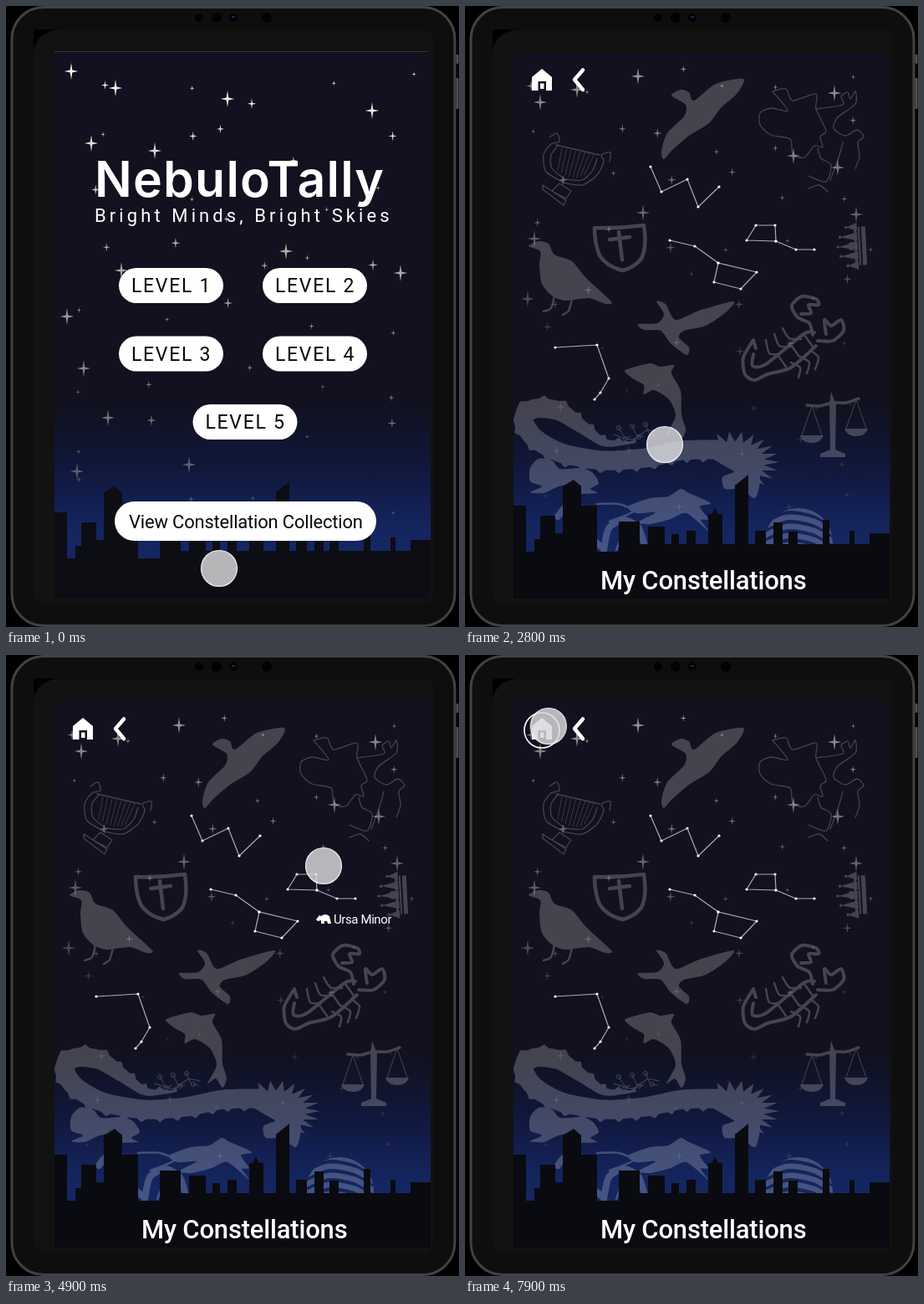
An HTML page for the animation above (8 s loop, 542 by 742 pixels).

```html
<!DOCTYPE html>
<html lang="en">
<head>
<meta charset="utf-8">
<title>Night sky tablet</title>
<style>
html, body { margin: 0; width: 100%; height: 100%; overflow: hidden; background: #000; }
svg { display: block; width: 542px; height: 742px; }
text { font-family: Roboto, Arial, sans-serif; fill: #fff; white-space: pre; }
.brand { font: 600 59px Inter, sans-serif; letter-spacing: 1.2px; }
.tag { font-size: 22px; letter-spacing: 4.1px; }
.level { font-size: 23px; letter-spacing: 1.7px; fill: #08080c; }
.view { font-size: 22px; letter-spacing: -.2px; fill: #08080c; }
.heading { font-size: 31px; font-weight: 500; letter-spacing: -.2px; }
.name { font-size: 15px; letter-spacing: -.4px; }
.line { fill: none; stroke: #fff; stroke-linejoin: round; stroke-linecap: round; }
#art { fill: #fff; opacity: .21; }

.view, .ring, .page, .label, .homeRing, .house, .cursor, .dot { animation: 8s linear infinite; }
.view, .ring, .label, .homeRing, .house { animation-timing-function: step-end; }
.view { animation-name: blue; }
.ring { animation-name: ring; }
.page { animation-name: page; }
.label { animation-name: label; }
.homeRing { animation-name: atHome; }
.house { animation-name: house; }
.cursor { animation-name: move; }
.dot { animation-name: press; }

@keyframes blue { 0%, 100% { fill: #08080c; } 7% { fill: #2946dc; } 25% { fill: #08080c; } }
@keyframes ring { 0%, 100% { opacity: 0; } 7% { opacity: 1; } 25% { opacity: 0; } }
@keyframes page { 0%, 21.25% { opacity: 0; } 25%, 100% { opacity: 1; } }
@keyframes label { 0%, 100% { opacity: 0; } 54% { opacity: 1; } 79.5% { opacity: 0; } }
@keyframes atHome { 0% { opacity: 0; } 90%, 100% { opacity: 1; } }
@keyframes house { 0% { fill: #fff; } 90%, 100% { fill: #dfe6ff; } }
@keyframes press {
  0%, 14% { transform: none; filter: none; }
  16%, 21% { transform: scale(.95); filter: drop-shadow(0 3px 2px rgba(0,0,0,.35)); }
  23%, 100% { transform: none; filter: none; }
}
@keyframes move {
  0%, 1.25% { transform: translate(255px, 672px); animation-timing-function: ease-in-out; }
  11.25%, 25% { transform: translate(283px, 605px); animation-timing-function: ease-in-out; }
  35%, 40% { transform: translate(239px, 524px); animation-timing-function: ease-in; }
  45% { transform: translate(293px, 349px); animation-timing-function: ease-out; }
  55%, 78.75% { transform: translate(380px, 252px); animation-timing-function: cubic-bezier(.4,0,.8,.8); }
  86.25% { transform: translate(176px, 118px); animation-timing-function: cubic-bezier(.2,.4,.5,1); }
  91.25%, 100% { transform: translate(99.8px, 85px); }
}
</style>
</head>
<body>
<svg viewBox="0 0 542 742">
  <defs>
    <linearGradient id="sky" x2="0" y2="1">
      <stop offset="0" stop-color="#11111f"/>
      <stop offset=".65" stop-color="#11111f"/>
      <stop offset=".76" stop-color="#10173b"/>
      <stop offset=".87" stop-color="#14255e"/>
      <stop offset="1" stop-color="#15286a"/>
    </linearGradient>
    <clipPath id="screen"><rect x="58" y="54" width="450" height="654"/></clipPath>
    <clipPath id="globe"><circle cx="399" cy="641" r="41"/></clipPath>
    <g id="city"></g>
  </defs>

  <!-- tablet -->
  <g fill="#515153">
    <rect x="538.5" y="58" width="3" height="11" rx="1"/>
    <rect x="538.5" y="86" width="3" height="37" rx="1"/>
  </g>
  <rect x="7" y="1.5" width="530" height="739" rx="38" fill="#0e0e0e" stroke="#424243" stroke-width="3"/>
  <rect x="32" y="28" width="480" height="686" rx="12" fill="#121213" stroke="#0e0e0f" stroke-width="2"/>
  <path d="M33 54V32Q33 28 38 28H62Q36 32 33 54Z"/>
  <g fill="#020203">
    <circle cx="231" cy="14" r="5"/><circle cx="252" cy="14" r="6"/>
    <circle cx="272" cy="14" r="5"/><circle cx="312" cy="14" r="6"/>
  </g>
  <path d="M269 14Q272 10 275 14Z" fill="#25247c"/>

  <g clip-path="url(#screen)">
    <!-- menu -->
    <rect x="58" y="54" width="450" height="654" fill="url(#sky)"/>
    <path d="M58 54.5H504" stroke="#37373f"/>
    <g id="menuStars" fill="#fffdf2"></g>
    <use href="#city" y="8" fill="#0d0d14"/>
    <text class="brand" x="106" y="228">NebuloTally</text>
    <text class="tag" x="106" y="258">Bright Minds, Bright Skies</text>
    <g id="levels"></g>
    <rect x="130" y="592" width="313" height="47" rx="23.5" fill="#fff"/>
    <rect class="ring line" x="124" y="586" width="325" height="60.5" rx="30" stroke-width="1.7"/>
    <text class="view" x="147" y="624">View Constellation Collection</text>

    <!-- collection -->
    <g class="page">
      <rect x="58" y="54" width="450" height="654" fill="url(#sky)"/>
      <path d="M58 54.5H508" stroke="#121213"/>
      <g id="art"></g>
      <g id="pageStars" fill="#fffdf2"></g>
      <g id="figures"></g>
      <use href="#city" fill="#0a0b10"/>
      <text class="heading" x="162" y="697">My Constellations</text>
      <path class="house" fill-rule="evenodd" d="M92 75L104 85V101H97V90H87.500V101H80V85ZM90 92.500H94.500V99H90Z"/>
      <path class="line" d="M141 76.500L131 88L141 100" stroke-width="4.500" stroke-linecap="butt" stroke-linejoin="miter"/>
      <circle class="homeRing line" cx="92" cy="90" r="21" stroke-width="1.6"/>
      <g class="label">
        <path fill="#fff" d="M371 316L375 311L377 312Q382 308 387 312L389 321H385L384 318L381 318V321H377V317L373 318Z"/>
        <text class="name" x="392" y="321">Ursa Minor</text>
      </g>
    </g>
  </g>

  <g class="cursor">
    <circle class="dot" r="21.5" fill="#dcdcde" fill-opacity=".82" stroke="#fff" stroke-opacity=".9" stroke-width="1.2"/>
  </g>
</svg>
<script>
const put = (id, html) => { document.getElementById(id).innerHTML = html; };
const times = (n, f) => Array.from({ length: n }, (_, i) => f(i));
const points = s => s.split(' ').map(p => p.split(',').map(Number));
const random = seed => () => (seed = seed * 16807 % 2147483647) / 2147483647;

// Smooth curve through key points
function curve(s, closed) {
  const p = points(s), n = p.length;
  const at = i => closed ? p[(i + n) % n] : p[Math.max(0, Math.min(n - 1, i))];
  const bend = (a, b, c, k) => [0, 1].map(j => (a[j] + (c[j] - b[j]) * k).toFixed(1));
  let d = 'M' + p[0];
  for (let i = 0; i < (closed ? n : n - 1); i++) {
    const [a, b, c, e] = [at(i - 1), at(i), at(i + 1), at(i + 2)];
    d += `C${bend(b, a, c, .13)} ${bend(c, b, e, -.13)} ${c}`;
  }
  return d + (closed ? 'Z' : '');
}
const blob = s => `<path d="${curve(s, true)}"/>`;
const stroke = (d, w) => `<path class="line" d="${d}" stroke-width="${w}"/>`;
const lines = (w, ...runs) => stroke(runs.map(r => curve(r)).join(''), w);

// Band of changing width along a curve, with optional spikes on one side
function ribbon(s, width, spike) {
  const path = document.createElementNS('http://www.w3.org/2000/svg', 'path');
  path.setAttribute('d', curve(s));
  const len = path.getTotalLength(), n = 80, left = [], right = [];
  for (let i = 0; i <= n; i++) {
    const a = path.getPointAtLength(len * i / n - .5), b = path.getPointAtLength(len * i / n + .5);
    const t = Math.atan2(b.y - a.y, b.x - a.x), w = width(i / n) / 2;
    const off = r => [b.x + r * Math.sin(t), b.y - r * Math.cos(t)].map(v => v.toFixed(1));
    left.push(off(w));
    right.unshift(off(-w - (i % 4 ? 0 : spike)));
  }
  return `<path d="M${left.concat(right).join('L')}Z"/>`;
}

// Four-pointed star
function star(x, y, r, alpha) {
  const d = times(8, i => {
    const a = i * Math.PI / 4, k = i % 2 ? r * .22 : r;
    return [x + k * .82 * Math.sin(a), y - k * Math.cos(a)].map(v => v.toFixed(1));
  });
  return `<path opacity="${alpha.toFixed(2)}" d="M${d.join('L')}Z"/>`;
}

// Bright key stars plus a jittered grid of small ones
function stars(id, keys, cols, rows, seed, fade) {
  const rnd = random(seed);
  const small = times(cols * rows, i => [
    58 + 450 / cols * (i % cols + .15 + .7 * rnd()),
    60 + 560 / rows * (Math.floor(i / cols) + .15 + .7 * rnd()),
    3 + 4 * rnd() ** 1.5
  ]);
  put(id, points(keys).map(p => [...p, 10]).concat(small)
    .map(([x, y, r]) => star(x, y, r, fade(y))).join(''));
}
stars('menuStars', '78,78 131,98 265,111 438,125 102,164 178,173 335,293 138,316 472,319 73,371 93,433 122,492 219,548 85,556',
  5, 8, 734211, y => Math.max(.28, 1.08 - y / 720));
stars('pageStars', '468,249 213,247 207,84 134,100 90,115 83,278 442,104 393,179 446,193 75,350',
  6, 9, 918273, y => Math.max(.12, .62 - y / 900));

put('levels', times(5, i => {
  const x = i < 4 ? 135 + i % 2 * 172 : 223.5, y = 313 + Math.floor(i / 2) * 81.5;
  return `<rect x="${x}" y="${y}" width="125" height="42" rx="21" fill="#fff"/>` +
    `<text class="level" x="${x + 15}" y="${y + 29}">LEVEL ${i + 1}</text>`;
}).join(''));

// Towers are x, width, top
const towers = '58,15,597 83,7,637 90,18,609 108,9,630 117,22,573 139,19,597 184,25,616 219,20,622 ' +
  '247,9,631 265,11,627 291,17,607 323,16,572 347,13,627 369,11,617 387,11,628 428,8,614 460,6,627 484,24,630';
put('city', '<path d="M58 720V652H209V643H508V720ZM117 574L130 566L139 574ZM323 573L339 560V573ZM295 608L299 599L303 608Z"/>' +
  points(towers).map(([x, w, y]) => `<rect x="${x}" y="${y}" width="${w}" height="${720 - y}"/>`).join(''));

put('figures', [
  '222,192 235,222 266,207 279,240 304,216',
  '245,280 275,287 303,307 349,318 330,338 298,330 303,307',
  '418,291 396,291 372,281 337,280 348,262 371,262 372,281',
  '108,408 158,405 172,445 162,462 155,470'
].map(run => `<polyline class="line" points="${run}" stroke-width="1.2" opacity=".65"/>` +
  points(run).map(([x, y]) => `<circle cx="${x}" cy="${y}" r="1.6" fill="#fff"/>`).join('')).join(''));

const birds =
  blob('247,107 258,100 268,103 274,113 300,93 333,87 326,104 306,122 292,140 268,155 248,172 238,183 235,174 242,152 262,132 264,118') +
  blob('76,287 88,281 100,284 107,297 128,305 145,325 175,353 168,356 148,349 120,352 104,346 92,332 89,310 90,293') +
  lines(2.5, '107,346 103,361 94,365', '128,350 124,364 117,369') +
  blob('207,380 230,379 238,368 229,353 240,356 252,375 280,364 321,353 312,366 288,382 262,388 256,396 268,408 265,417 246,403 234,388 214,387');

const dolphin = blob('191,436 204,431 222,427 234,431 250,429 247,439 258,460 259,488 264,506 259,517 251,506 241,512 252,490 244,470 226,459 214,464 214,453 202,446');

const lyre =
  lines(1.3, '118,211 97,198 94,178 103,165 113,162 110,152 101,157', '118,211 140,214 158,202 166,186 163,178 174,175 173,186',
    '120,207 104,194 103,178 112,166', '120,207 140,208 153,196 158,182', '109,166 161,178') +
  stroke('M93 214L121 232L118 238L93 219ZM113 212L127 221L121 230L104 221Z', 1.3) +
  times(8, i => stroke(`M${116 + 5.5 * i} ${170 + i}L${111 + 4.5 * i} ${196 + 9 * Math.sin(i / 3)}`, .8)).join('');

const hero = lines(1.3,
  '368,102 384,99 392,113 420,105 420,123 432,149 425,156 428,169 418,167 406,181 392,177 389,159 366,154 353,142 353,128 366,122 386,125 368,102',
  '420,123 452,118 450,108 458,103 461,111 467,102 467,117 446,133 441,146 455,155 469,148 477,156 470,163 472,180 467,194',
  '452,163 447,181 437,208', '422,170 426,182 438,190 432,210 411,203', '411,218 424,214 434,222');

const crown = `<g transform="rotate(-3 465 287)">` +
  times(5, i => {
    const y = 264 + 11.5 * i, tip = 457 - 11 * Math.sin(Math.PI * i / 4);
    return `<path d="M470 ${y - 5}L${tip} ${y}L470 ${y + 5}Z"/><circle cx="${tip}" cy="${y}" r="1.8"/>`;
  }).join('') + '<path d="M466 265H469V309H466ZM471 264H473V310H471ZM475 264H480V310H475Z"/></g>' +
  '<circle class="line" cx="463" cy="287" r="4" stroke-width="2"/>';

const shield = stroke('M155 265Q185 266 214 262Q218 288 211 302Q203 312 189 316Q170 312 161 298Q155 284 155 265ZM184 270L188 303M173 279L197 276', 4.5);

const scorpion =
  lines(4, '345,399 333,420 335,440 346,447 362,440 390,432 420,406', '345,399 348,409', '345,416 344,430 360,428 405,392 418,390',
    '416,393 412,379 398,372 391,358 403,347 420,350 423,357 411,357 414,367 402,368',
    '422,400 440,400 453,388 450,375 438,382 430,375 432,392') +
  times(3, i => lines(2.5,
    `${402 - 13 * i},${398 + 9 * i} ${388 - 12 * i},${397 + 9 * i} ${380 - 10 * i},${385 + 7 * i}`,
    `${414 - 12 * i},${412 + 7 * i} ${423 - 11 * i},${420 + 6 * i} ${419 - 10 * i},${434 + 5 * i}`) +
    stroke(`M${406 - 16 * i} ${393 + 12 * i}l10 14`, 2.5)).join('');

const mane = times(27, i => {
  const a = -2.1 + i * .14, r = i % 2 ? 54 : 36;
  return `${(322 + r * Math.cos(a)).toFixed(1)} ${(545 + r * .68 * Math.sin(a)).toFixed(1)}`;
});
const dragon =
  ribbon('205,521 168,522 140,503 112,484 84,481 69,492 82,515 115,534 165,543 215,540 260,531 305,530',
    t => Math.min(23, 2 + 80 * t), 4) +
  `<path d="M${mane.join('L')}L322 556L296 541Z"/>` +
  blob('345,545 322,557 308,563 311,577 330,577 347,588 353,565') +
  lines(1.2, '178,512 200,518 218,507 232,509') +
  times(6, i => {
    const x = 184 + 8 * i, y = 512 + (i % 2 ? 6 : -8) - i;
    return stroke(`M${x + 6} 514L${x} ${y}`, 1) + `<circle class="line" cx="${x}" cy="${y}" r="2.5"/>`;
  }).join('');

const pan = (x, y, top) => stroke(`M${x - 12} ${y}L${x} ${top}L${x + 12} ${y}`, 1) +
  `<path d="M${x - 14} ${y}h28q-3 9 -14 9q-11 0 -14 -9Z"/>`;
const scales = pan(415, 513, 478) + pan(468, 505, 470) +
  lines(3.5, '409,477 424,478 440,474 456,474 471,469') +
  '<path d="M438 461L444 476L443 530L455 535V539H425V535L437 530L436 476Z"/>';

const beasts =
  blob('78,552 88,541 104,543 114,553 138,552 152,557 160,570 150,577 158,582 134,582 126,573 112,574 94,582 78,581 92,574 78,568') +
  blob('195,598 222,588 243,586 258,577 268,582 294,594 281,598 291,613 282,614 291,627 265,606 246,613 222,619 207,617 228,605 205,606') +
  lines(8, '111,610 122,598 142,602 151,620 152,636 163,646', '166,650 172,624 190,614 208,624 216,650') +
  lines(2.5, '158,595 184,595 201,604 173,616', '181,650 188,634 200,628');

const globe = '<g clip-path="url(#globe)">' +
  times(5, i => lines(6.5, `350,${615 + 11 * i} 385,${600 + 11 * i} 418,${605 + 11 * i} 446,${622 + 11 * i}`)).join('') + '</g>';

put('art', birds + dolphin + lyre + hero + crown + shield + scorpion + dragon + scales + beasts + globe);
</script>
</body>
</html>
```
